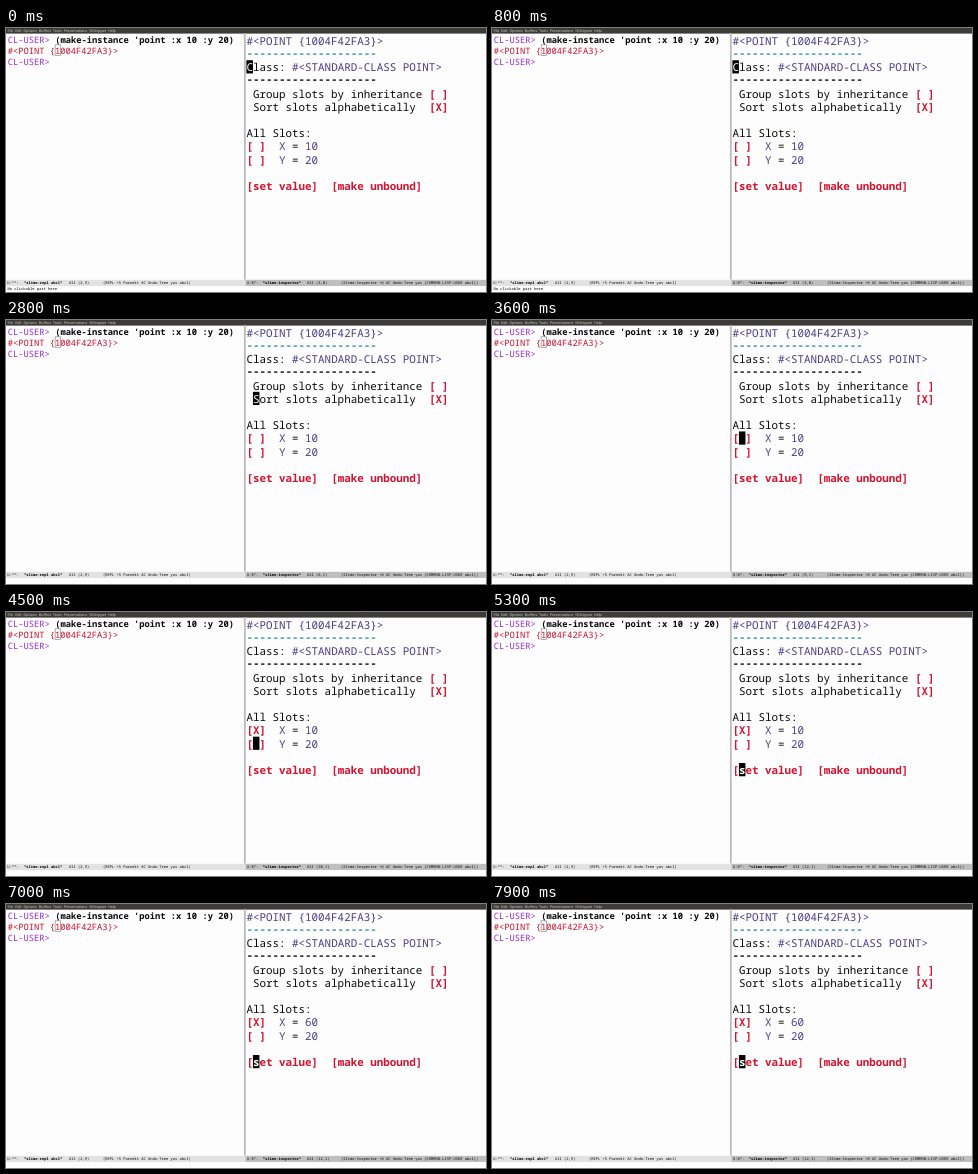
Write an HTML page that moves like this. It is 480 px wide and 264 px high and loops after 8 s.

```html
<!DOCTYPE html>
<html lang="en">
<head>
<meta charset="utf-8">
<title>Inspector session</title>
<style>
  html, body { margin: 0; width: 100%; height: 100%; overflow: hidden; background: #fdfdfd; }
  svg { display: block; width: 100%; height: 100%; }
  text {
    font-family: "Noto Sans Mono", "DejaVu Sans Mono", monospace;
    white-space: pre;
    text-rendering: geometricPrecision;
  }
  .menu { font-family: "Open Sans", sans-serif; }
</style>
</head>
<body>
<svg id="stage" viewBox="0 0 480 264"></svg>
<script>
const LOOP = 8000;
const BLACK = "#080808", RED = "#d3122f", SLATE = "#483d8b", PURPLE = "#9a2be0", TEAL = "#2f9595";

// Text grids: origin, column width, first baseline, row height
const repl = { x: 1.7, y: 15, col: 5.27, row: 10.8 };
const inspector = { x: 240.4, y: 16.8, col: 6.52, row: 13.2 };
const modeLeft = { x: 1.2, y: 256.1, col: 2.26, row: 6 };
const modeRight = { ...modeLeft, x: 241 };
const echoArea = { ...modeLeft, x: 1.6, y: 261.9 };

const stage = document.getElementById("stage");

function add(tag, attrs, content = "") {
  const node = document.createElementNS("http://www.w3.org/2000/svg", tag);
  for (const key in attrs) node.setAttribute(key, attrs[key]);
  node.textContent = content;
  return stage.appendChild(node);
}

const rect = (x, y, width, height, fill) => add("rect", { x, y, width, height, fill });

function write(grid, row, col, content, fill = BLACK, weight = 400) {
  return add("text", {
    x: grid.x + col * grid.col,
    y: grid.y + row * grid.row,
    "font-size": grid.col / 0.6,
    "font-weight": weight,
    fill
  }, content);
}

function cellBox(grid, row, col) {
  return {
    x: grid.x + col * grid.col,
    y: grid.y + (row - 0.83) * grid.row,
    width: grid.col,
    height: grid.row
  };
}

function place(node, attrs) {
  for (const key in attrs) node.setAttribute(key, attrs[key]);
}

// Window frame
rect(0, 0, 480, 264, "#fdfdfd");
rect(0, 0, 480, 5.6, "#3c3b37");
const menu = add("text", { class: "menu", x: 1.5, y: 4.1, "font-size": 3.65, fill: "#d8d5cc" });
rect(237.8, 5.6, 2.2, 246, "#e9e9e9");
rect(238.5, 5.6, 0.8, 246, "#8c8c8c");

// REPL pane
write(repl, 0, 0, "CL-USER>", PURPLE, 500);
write(repl, 0, 9, "(make-instance 'point :x 10 :y 20)", BLACK, 600);
write(repl, 1, 0, "#<POINT {1004F42FA3}>", RED, 500);
write(repl, 2, 0, "CL-USER>", PURPLE, 500);
add("rect", { ...cellBox(repl, 1, 9), fill: "none", stroke: "#777", "stroke-width": 0.6 });

// Inspector pane; its rules sit slightly above the text's own hyphen height
const rule = (row, fill) => write(inspector, row - 0.08, 0, "-".repeat(20), fill, 700);
write(inspector, 0, 0, "#<POINT {1004F42FA3}>", SLATE);
rule(1, TEAL);
write(inspector, 2, 0, "Class:");
write(inspector, 2, 7, "#<STANDARD-CLASS POINT>", SLATE);
rule(3, BLACK);
write(inspector, 4, 1, "Group slots by inheritance");
write(inspector, 4, 28, "[ ]", RED, 600);
write(inspector, 5, 1, "Sort slots alphabetically");
write(inspector, 5, 28, "[X]", RED, 600);
write(inspector, 7, 0, "All Slots:");

function slotLine(row, name, value) {
  const box = write(inspector, row, 0, "[ ]", RED, 600);
  write(inspector, row, 5, name, SLATE);
  write(inspector, row, 7, "=");
  return { box, value: write(inspector, row, 9, value, SLATE) };
}
const slotX = slotLine(8, "X", "10");
slotLine(9, "Y", "20");
write(inspector, 11, 0, "[set value]", RED, 600);
write(inspector, 11, 13, "[make unbound]", RED, 600);

// Mode lines
rect(0, 251.8, 238.8, 6.2, "#e2e2e2");
rect(239.2, 251.8, 240.8, 6.2, "#bfbfbf");
write(modeLeft, 0, 0, "U:**-");
write(modeLeft, 0, 7.4, "*slime-repl abcl*", BLACK, 700);
write(modeLeft, 0, 27.4, "All (2,9)");
write(modeLeft, 0, 42.4, "(REPL +5 Paredit AC Undo-Tree yas abcl)");
write(modeRight, 0, 0, "U:%*-");
write(modeRight, 0, 7, "*slime-inspector*", BLACK, 700);
const position = write(modeRight, 0, 26.6, "");
const modes = write(modeRight, 0, 41.6, "");

// Moving parts
const echo = write(echoArea, 0, 0, "");
const echoCursor = rect(0, 258.2, 2.4, 5.4, BLACK);
const cursor = add("rect", { "stroke-width": 0.6 });
const cursorGlyph = write(inspector, 0, 0, "", "#fff");

const moves = [
  [0, 2, 0, "C"], [1500, 2, 1, "l"], [2300, 3, 1, "-"], [2500, 4, 1, "G"],
  [2700, 5, 1, "S"], [2900, 6, 0, ""], [3100, 7, 1, "l"], [3300, 8, 1, " "],
  [4400, 9, 1, " "], [4700, 10, 0, ""], [4900, 11, 1, "s"]
];
const MARK = 3900, PROMPT = 5400, COMMIT = 6800;
const keys = [[5900, "6"], [6300, "0"]];
const promptText = "Set slot X to (evaluated) : ";

function render(t) {
  const [, row, col, glyph] = moves.filter(([at]) => at <= t).pop();
  const marked = t >= MARK;
  const prompting = t >= PROMPT && t < COMMIT;
  const shown = row === 8 && marked ? "X" : glyph;

  place(cursor, {
    ...cellBox(inspector, row, col),
    fill: prompting ? "none" : "#000",
    stroke: prompting ? "#777" : "none"
  });
  place(cursorGlyph, {
    x: inspector.x + col * inspector.col,
    y: inspector.y + row * inspector.row,
    "font-weight": row >= 8 ? 600 : 400
  });
  cursorGlyph.textContent = prompting ? "" : shown;

  slotX.box.textContent = marked ? "[X]" : "[ ]";
  slotX.value.textContent = t >= COMMIT ? "60" : "10";
  position.textContent = `All (${row + 1},${col})`;
  modes.textContent =
    `(Slime-Inspector +6 AC Undo-Tree yas {COMMON-LISP-USER abcl${prompting ? " 1" : ""}})`;
  menu.textContent =
    `File  Edit  Options  Buffers  Tools  ${prompting ? "Minibuf" : "Presentations"}  YASnippet  Help`;

  const typed = keys.filter(([at]) => at <= t).map(([, key]) => key).join("");
  echo.textContent = prompting ? promptText + typed : t < 1500 ? "No clickable part here" : "";
  echo.setAttribute("fill", prompting ? "#2424a8" : BLACK);
  place(echoCursor, {
    x: echoArea.x + (promptText.length + typed.length) * echoArea.col,
    visibility: prompting ? "visible" : "hidden"
  });
}

const start = performance.now();
function tick() {
  render((performance.now() - start) % LOOP);
  requestAnimationFrame(tick);
}
tick();
</script>
</body>
</html>
```
